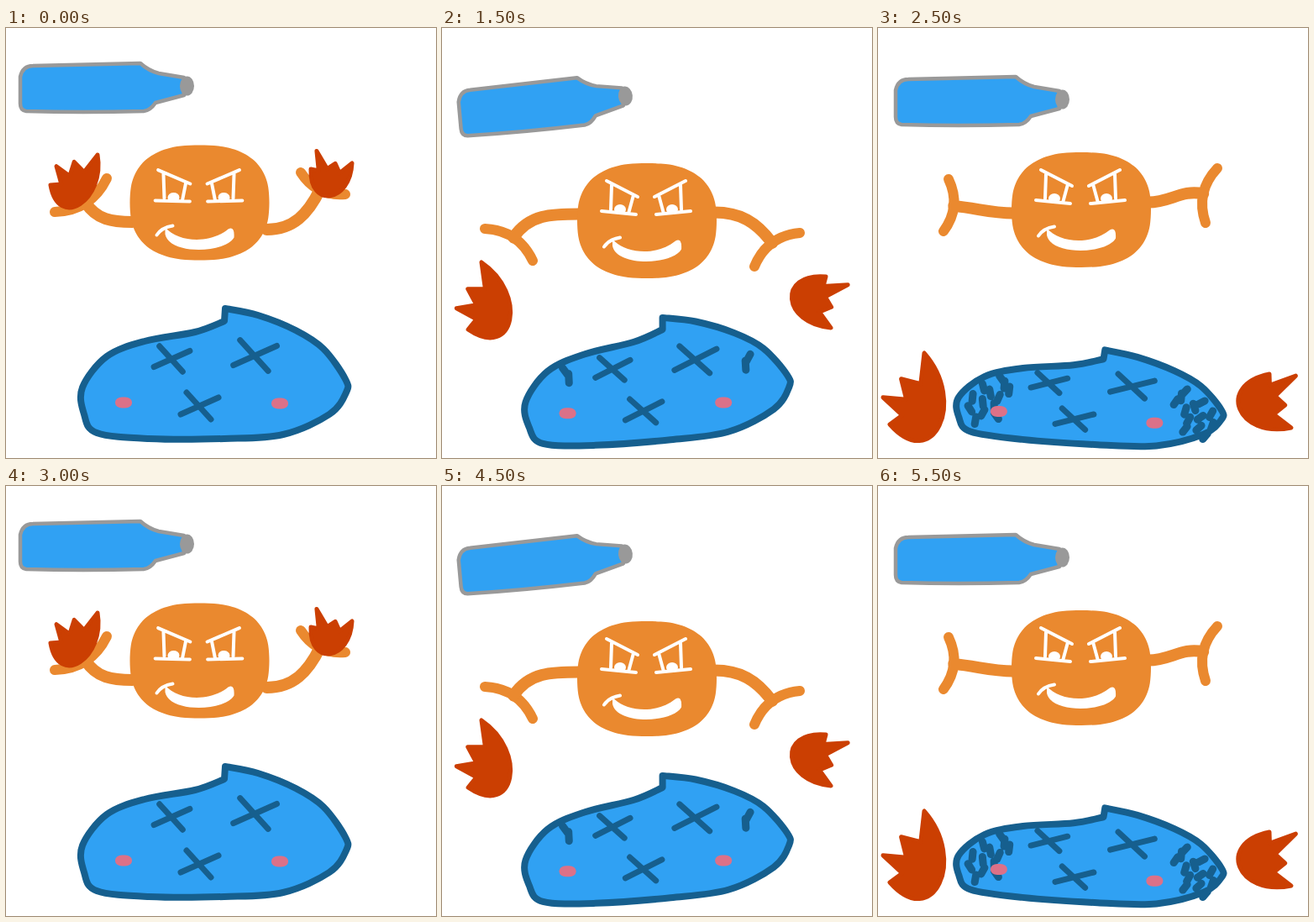
An HTML page that plays this animation: 512 by 512 pixels, repeating every 6 s.

```html
<!DOCTYPE html>
<html lang="en">
<head>
<meta charset="utf-8">
<title>Fireball and puddle</title>
<style>
html, body { margin: 0; width: 100%; height: 100%; overflow: hidden; background: #fff; }
svg { display: block; width: 100vw; height: 100vh; }
path { stroke-linecap: round; stroke-linejoin: round; }
</style>
</head>
<body>
<svg id="stage" viewBox="0 0 512 512"></svg>
<script>
const STEP = 500;
const ORANGE = '#ea892f', RED = '#cb3f02', BLUE = '#30a1f3', NAVY = '#165f8e', GREY = '#999', PINK = '#dc7188';

const mix = (a, b, t) => a.map((v, i) => v + (b[i] - v) * t);
const stroke = (d, color, w, fill = 'none') =>
  `<path d="${d}" fill="${fill}" stroke="${color}" stroke-width="${w}"/>`;
const random = n => Math.abs(Math.sin(n * 127.1) * 43758.5) % 1;

// Closed smooth curve through points; a repeated point makes a corner.
function smooth(pts) {
  const at = i => pts[(i + pts.length) % pts.length];
  let d = `M${pts[0]}`;
  pts.forEach((q, i) => {
    const [p, r, s] = [at(i - 1), at(i + 1), at(i + 2)];
    if (q === r) return;
    const c1 = q.map((v, k) => v + (r[k] - p[k]) / 6);
    const c2 = r.map((v, k) => v - (s[k] - q[k]) / 6);
    d += `C${c1} ${c2} ${r}`;
  });
  return d + 'Z';
}

// tool: x, y, turn | head: x, y, face drop, eye turn | blob: x, y, turn, squash
// arms: both hand ends, shoulder height | fires: first and last tip
const up = {
  tool: [0, 0, 0], head: [230.5, 208, 7.5, -4], blob: [0, 0, 0, 1], burn: [0],
  armL: [120, 179, 58, 219, 23], armR: [351, 172, 404, 198, 32],
  fireL: [109, 151, 53, 187], fireR: [363, 168, 412, 161]
};
const out = {
  tool: [-2, -4, 4.6], head: [248, 212.5, 0, 0], blob: [0, 0, 4, 1], burn: [0],
  armL: [108, 189, 121, 244, 8], armR: [382, 185, 391, 241, -14],
  fireL: [82, 185, 67, 249], fireR: [403, 189, 427, 231]
};
const down = {
  tool: [4, 30, -5.2], head: [244, 229.5, 0, 0], blob: [9, 8, -4.2, 0.94], burn: [2],
  armL: [51, 239, 108, 277, -8], armR: [426, 244, 372, 284, -10],
  fireL: [47, 279, 31, 359], fireR: [457, 296, 463, 357]
};
const wide = {
  tool: [4, 16, 0], head: [242, 216.5, 0, 0], blob: [4, 17, 4, 0.73], burn: [13],
  armL: [84, 180, 78, 242, 4], armR: [404, 167, 390, 232, -9],
  fireL: [55, 387, 14, 472], fireR: [466, 412, 492, 476]
};
const between = (a, b, t) =>
  Object.fromEntries(Object.keys(a).map(k => [k, mix(a[k], b[k], t)]));

const poses = [
  up,
  { ...between(up, out, 0.25), tool: [0, 1, -3.6], blob: up.blob },
  out,
  down,
  between(down, wide, 0.5),
  wide
];

function drawTool([x, y, turn]) {
  const d = 'M17 90V58Q20 45 32 45L160 42Q170 51 182 54L212 59V80L178 89Q172 98 164 99Q90 101 24 99Q17 98 17 90Z';
  return `<g transform="translate(${x} ${y}) rotate(${turn} 17 72)">` + stroke(d, GREY, 4.5, BLUE) +
    `<ellipse cx="215.5" cy="69" rx="8.5" ry="11.5" fill="${GREY}"/></g>`;
}

function drawEye(x, y, flip, turn) {
  return `<g transform="translate(${x} ${y}) scale(${flip} 1) rotate(${turn})">` +
    stroke('M-15-20L22-1M-9-15L-10 14M17-3L11 19M-21 16L20 20', '#fff', 4) +
    '<ellipse cx="1" cy="14" rx="7" ry="6" fill="#fff"/></g>';
}

function drawHead([x, y, drop, turn]) {
  const pow = v => Math.sign(v) * Math.abs(v) ** 0.8;
  const skin = Array.from({ length: 32 }, (_, i) => {
    const a = i * Math.PI / 16;
    return [83 * pow(Math.cos(a)), 68.5 * pow(Math.sin(a))];
  });
  return `<g transform="translate(${x} ${y})"><path d="${smooth(skin)}" fill="${ORANGE}"/>` +
    `<g transform="translate(0 ${drop})">` +
    drawEye(-33, -27.5, 1, turn) + drawEye(31, -27.5, -1, turn) +
    stroke('M-51 31Q-45 22 -32 20', '#fff', 4) +
    '<path d="M-41 22C-25 40 12 42 34 24Q42 20 41 34C30 53 -36 55 -41 30Z" fill="#fff"/></g></g>';
}

// The hand bows toward the body; the arm leaves it at a right angle.
function drawArm([ax, ay, bx, by, drop], [hx, hy], side) {
  const len = Math.hypot(bx - ax, by - ay);
  const n = [-side * (by - ay) / len, side * (bx - ax) / len];
  const mid = [(ax + bx) / 2, (ay + by) / 2];
  const along = (p, k) => p.map((v, i) => v + n[i] * k);
  const wrist = along(mid, len * 0.15);
  const shoulder = [hx + side * 80, hy + drop];
  const reach = 0.4 * Math.hypot(shoulder[0] - wrist[0], shoulder[1] - wrist[1]);
  return stroke(`M${ax} ${ay}Q${along(mid, len * 0.3)} ${bx} ${by}`, ORANGE, 12) +
    stroke(`M${wrist}C${along(wrist, reach)} ${shoulder[0] + side * reach} ${shoulder[1]} ${shoulder}`, ORANGE, 14);
}

// Inner tips and heel, measured along and across the line from first to last tip
const flames = {
  left: { side: -1, tips: [[0.42, 0.12], [0.73, 0.225]], heel: [0.74, -0.57] },
  right: { side: 1, tips: [[0.2, 0.41], [0.6, 0.05]], heel: [0.37, -0.7] }
};

function drawFire([ax, ay, bx, by], { side, tips, heel }) {
  const [ux, uy] = [bx - ax, by - ay];
  // The right flame opens along the turned axis, the left one along its mirror image.
  const at = ([t, k]) => [ax + ux * t + side * uy * k, ay + uy * t - side * ux * k];
  const points = [[0, 0], ...tips, [1, 0]].map(at);
  const root = at(heel);
  let d = `M${points[0]}`;
  for (let i = 1; i < points.length; i++) {
    const valley = mix(mix(points[i - 1], points[i], 0.5), root, 0.3);
    d += `L${valley}L${points[i]}`;
  }
  const bulge = [0, 1].map(k => (root[k] - (points[0][k] + points[3][k]) / 2) * 4 / 3);
  const [c1, c2] = [points[3], points[0]].map(p => [p[0] + bulge[0], p[1] + bulge[1]]);
  return stroke(`${d}C${c1} ${c2} ${points[0]}Z`, RED, 5, RED);
}

const peak = [261, 334], notch = [260, 349];
const outline = [peak, peak, [300, 342], [345, 360], [378, 382], [404, 418], [405, 434], [385, 460],
  [330, 484], [260, 489], [170, 489], [108, 482], [93, 460], [91, 428], [120, 391], [165, 373],
  [225, 362], notch, notch];
const crosses = [[197, 394, 0.95], [296, 390, 1.15], [230, 450, 1]];
const cheeks = [[140, 446], [326, 447]];

function drawBlob([dx, dy, turn, squash], burn) {
  const [cos, sin] = [Math.cos(turn * Math.PI / 180), Math.sin(turn * Math.PI / 180)];
  const place = ([x, y]) => {
    const [px, py] = [x - 210, (y - 440) * squash];
    return [210 + dx + px * cos - py * sin, 440 + dy + px * sin + py * cos];
  };
  const line = (a, b) => `M${place(a)}L${place(b)}`;
  const marks = crosses.map(([x, y, s]) =>
    line([x - 15 * s, y - 16 * s], [x + 14 * s, y + 16 * s]) +
    line([x - 22 * s, y + 10 * s], [x + 23 * s, y - 10 * s])).join('');

  // Scorch dabs spread down both ends
  let dabs = '';
  for (let i = 0; i < Math.round(burn); i++) {
    for (const side of [-1, 1]) {
      const a = (side * 8 - 33 + i * 5) * -Math.PI / 180 * -1 - (side > 0 ? 0.28 : 0);
      const r = 1 - (i % 3) * 0.1;
      const x = 250 + side * 145 * r * Math.cos(a), y = 440 + 72 * r * Math.sin(a);
      const b = (0.3 + random(i + side * 20)) * 1.6;
      const [ex, ey] = [4 * Math.cos(b) * -side, 6 * Math.sin(b)];
      dabs += line([x - ex, y - ey], [x + ex, y + ey]);
    }
  }
  const blush = cheeks.map(place).map(([x, y]) =>
    `<rect x="${x - 10}" y="${y - 6.5}" width="20" height="13" rx="8" ry="6" fill="${PINK}"/>`).join('');
  return stroke(smooth(outline.map(p => place(p)).map((p, i, all) =>
    i && outline[i] === outline[i - 1] ? all[i - 1] : p)), NAVY, 8, BLUE) +
    stroke(dabs, NAVY, 9) + stroke(marks, NAVY, 7) + blush;
}

const stage = document.getElementById('stage');
stage.innerHTML = poses.map(p => '<g display="none">' + drawTool(p.tool) +
  drawArm(p.armL, p.head, -1) + drawArm(p.armR, p.head, 1) + drawHead(p.head) +
  drawBlob(p.blob, p.burn[0]) +
  drawFire(p.fireL, flames.left) + drawFire(p.fireR, flames.right) + '</g>').join('');

const views = [...stage.children];
let shown = -1;
function tick() {
  const i = Math.floor(performance.now() / STEP) % views.length;
  if (i !== shown) {
    views.forEach((v, k) => v.setAttribute('display', k === i ? 'inline' : 'none'));
    shown = i;
  }
  requestAnimationFrame(tick);
}
tick();
</script>
</body>
</html>
```
